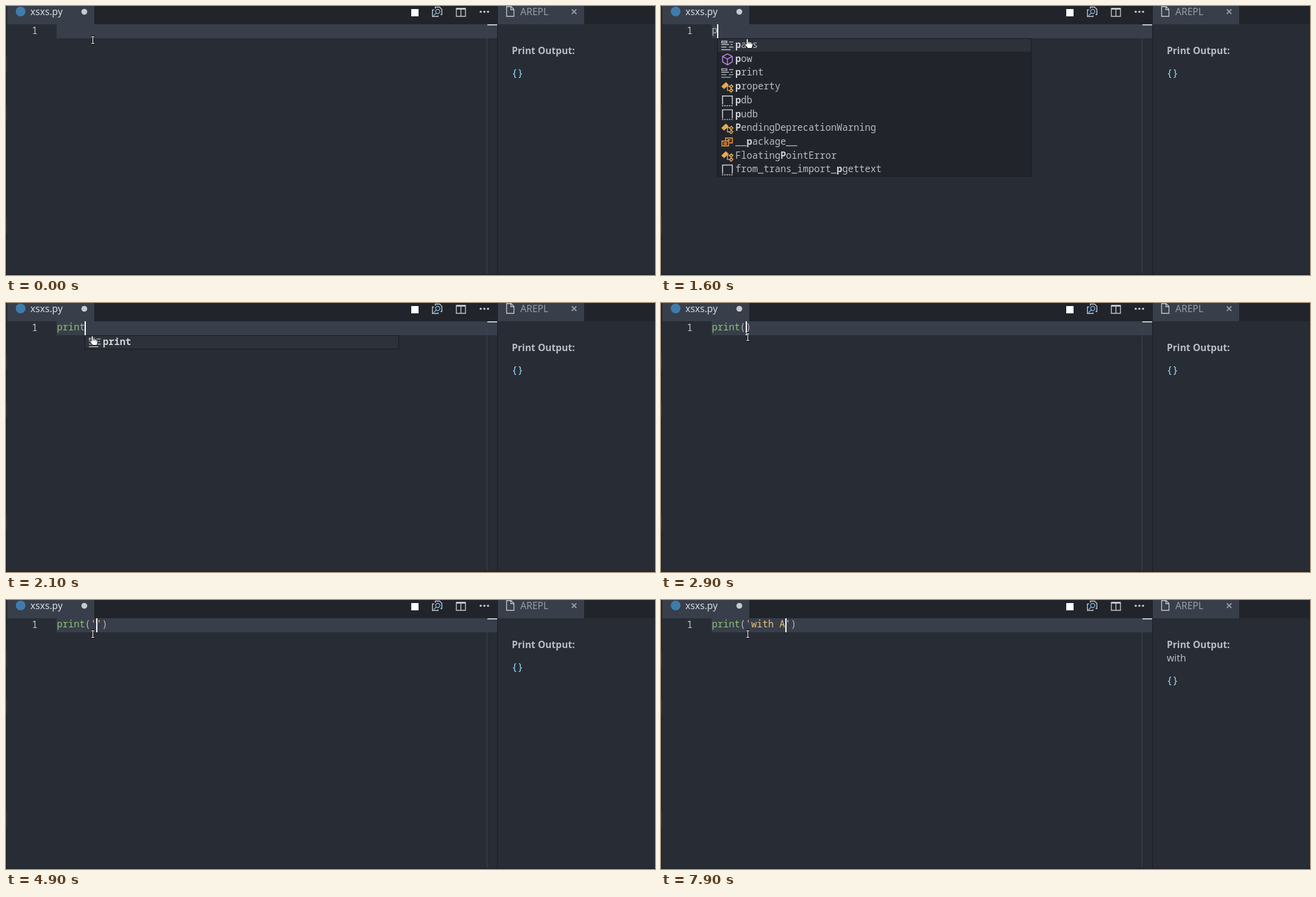
Recreate the animation shown at these times as an HTML page. Size 1065 px wide and 442 px high, loop 8 s.

```html
<!DOCTYPE html>
<html lang="en">
<head>
<meta charset="utf-8">
<title>Typing in an editor</title>
<style>
html, body { margin: 0; width: 100%; height: 100%; overflow: hidden; background: #282c34; }
svg { display: block; width: 1065px; height: 442px; }
text { font: 15.6px "Noto Sans", sans-serif; fill: #b9bcc2; white-space: pre; }
.mono { font: 15.4px "Noto Sans Mono", monospace; }
.mono .hit { font-weight: bold; fill: #d2d4d8; }
.result { font-size: 16px; fill: #9cdcfe; }
</style>
</head>
<body>
<svg viewBox="0 0 1065 442">
  <defs>
    <g id="keyword" fill="none" stroke="#b8bbc0" stroke-width="1.4">
      <path d="M.7 1.7H9.1V4.5H.7ZM12.6 3.1H19.6M0 7.3H12.6M15.4 7.3H18.2M0 11.5H8.4M12.6 11.5H19.6M0 15.7H15.4"/>
    </g>
    <g id="cube" fill="none" stroke="#b180d7" stroke-width="1.6">
      <path d="M10 0L18 4V13L10 18L2 13V4ZM2 4L10 8.5L18 4M10 8.5V18"/>
    </g>
    <g id="klass" fill="#e8ab53" stroke="#e8ab53">
      <path d="M7.5 1.5L11.5 5.5L4.5 12L.5 8Z"/>
      <path d="M8 7.5H14M10 7.5V14.5H14" fill="none" stroke-width="1.4"/>
      <path d="M16.5 5.5L19 8L16 11L13.5 8.5ZM16.5 12L19 14.5L16 17.5L13.5 15Z" fill="none" stroke-width="1.5"/>
    </g>
    <g id="module" fill="none" stroke="#c0c2c6" stroke-width="1.7">
      <path d="M2 15V1H18V15"/>
      <path d="M1 17H19" stroke-dasharray="2.2 1.6"/>
    </g>
    <g id="variable" fill="none" stroke="#e8923a" stroke-width="1.6">
      <path d="M7 6V2H18V10H13M1 7H12V15H1ZM3.5 10H9.5M3.5 12.5H9.5M10 5H15"/>
    </g>
    <g id="hand" stroke="#111">
      <path d="M140 54.5Q141.5 53 143 55V59Q145 58 146 59.5Q148 59 148.5 60.5Q150.5 60.5 150.5 62.5V65L149 69.5H142.5L137.5 63.5Q138 61.5 140 63Z" fill="#fff"/>
      <path d="M143 59V62M145.7 60V62.5M148.3 61V63" stroke-width=".8"/>
    </g>
    <g id="beam" fill="none">
      <path d="M139.5 50H145.5M142.5 50V62M139.5 62H145.5" stroke="#111" stroke-width="2.6"/>
      <path d="M140 50.5H145M142.5 50V62M140 61.5H145" stroke="#fff" stroke-width="1.1"/>
    </g>
  </defs>

  <!-- window, tabs and panes -->
  <path d="M0 0H1065V30H0ZM0 30H1.5V442H0ZM0 440H1065V442H0Z" fill="#21252b"/>
  <path d="M0 83H1.5V110H0ZM0 163H1.5V188H0ZM0 347H1.5V374H0Z" fill="#30353e"/>
  <path d="M2 0H145V30H2ZM807 0H949V30H807ZM83 30H806V53H83Z" fill="#383e4a"/>
  <path d="M145.5 0V30M806.5 0V442M949.5 0V30" stroke="#1b1e23"/>
  <path d="M789.5 30V440" stroke="#3d424b"/>
  <path d="M790 30H806V32H790Z" fill="#c4c6c9"/>

  <circle cx="24" cy="9" r="8" fill="#3f7cac"/>
  <text x="40" y="15" style="fill:#d7dae0">xsxs.py</text>
  <circle cx="128.5" cy="9.5" r="4.8" fill="#c8c9cb"/>
  <rect x="665" y="5" width="12" height="12" fill="#fff"/>
  <g fill="none" stroke="#c5c6c8" stroke-width="1.4">
    <path d="M704.5 4.5V1.7H711.5L715.3 5.5V14H713M702.5 6.5H699.7V17.3H709V15.5"/>
    <path d="M739 4H754V17H739ZM746.5 4V17"/>
    <path d="M739 4.5H754" stroke-width="3"/>
    <path d="M821.5 1V17H833.5V5.5L829 1ZM828.5 1V6H833.5"/>
    <path d="M928.5 5.5L936 13M936 5.5L928.5 13" stroke="#989da6" stroke-width="1.8"/>
    <g stroke="#75aede" stroke-width="1.5"><circle cx="708.5" cy="9" r="3.4"/><path d="M706 11.5L701.5 16"/></g>
  </g>
  <g fill="#c8c9cb"><circle cx="779" cy="9.5" r="1.8"/><circle cx="785" cy="9.5" r="1.8"/><circle cx="791" cy="9.5" r="1.8"/></g>
  <text x="844" y="15" style="fill:#989da6">AREPL</text>
  <text x="42.5" y="45.5" class="mono" style="fill:#c8cacd">1</text>
  <text x="830" y="79" style="font-weight:bold">Print Output:</text>
  <g id="live"></g>
</svg>
<script>
const LOOP = 8000, LEFT = 83.45, CHAR = 9.3, ROW = 22.7;
const live = document.getElementById('live');

// time, text, caret column, completion query
const edits = [
  [-500, '', 0],
  [1600, 'p', 1, 'p'],
  [1700, 'pr', 2, 'p'],
  [1800, 'pri', 3, 'pr'],
  [1900, 'prin', 4, 'prin'],
  [2100, 'print', 5, 'print'],
  [2900, 'print()', 6],
  [3300, 'print()', 7],
  [3900, "print('')", 7],
  [5100, "print('w')", 8],
  [5200, "print('wi')", 9],
  [5400, "print('wit')", 10],
  [5600, "print('with')", 11],
  [5800, "print('with ')", 12],
  [7900, "print('with A')", 13]
];

const symbols = [
  ['pass', 'keyword'], ['pow', 'cube'], ['print', 'keyword'], ['property', 'klass'],
  ['pdb', 'module'], ['pudb', 'module'], ['PendingDeprecationWarning', 'klass'],
  ['__package__', 'variable'], ['FloatingPointError', 'klass'],
  ['from_trans_import_pgettext', 'module']
];

const span = (text, color) => `<tspan style="fill:${color}">${text}</tspan>`;
const mono = (x, y, body) => `<text class="mono" x="${x}" y="${y}">${body}</text>`;
const rect = (x, y, w, h, style) => `<rect x="${x}" y="${y}" width="${w}" height="${h}" ${style}/>`;

// Marks the query letters in order from the first word start; empty if they do not all occur.
function highlight(label, query) {
  let next = 0, out = '';
  const start = label.search(/\bp|_p|P/);
  [...label].forEach((c, i) => {
    const hit = i >= start && c.toLowerCase() === query[next];
    if (hit) next++;
    out += hit ? `<tspan class="hit">${c}</tspan>` : c;
  });
  return next === query.length ? out : '';
}

function popup(x, query) {
  const rows = symbols.map(([label, icon]) => [highlight(label, query), icon]).filter(r => r[0]);
  return rect(x + .5, 53.5, 515, ROW * rows.length - .5, 'fill="#21252b" stroke="#181a1f"') +
    rect(x + 1, 54, 514, ROW - 1.5, 'fill="#2c313a"') +
    rows.map(([body, icon], i) =>
      `<use href="#${icon}" x="${x + 7}" y="${56 + ROW * i}"/>` +
      mono(x + 30, 69 + ROW * i, body)).join('');
}

function code(text) {
  const [, name, open, string, close] = text.match(/^(\w*)(\(?)('.*')?(\)?)$/);
  return span(name, name === 'print' ? '#8bc275' : '#b4b9c1') + span(open, '#b4b9c1') +
    span(string || '', '#e5c07b') + span(close, '#b4b9c1');
}

function draw(t) {
  const [since, text, column, query] = edits.filter(e => e[0] <= t).pop();
  const caret = Math.floor(LEFT + CHAR * column);
  let out = '';

  if (t >= 3000 && t < 3900) {
    const box = 'fill="#006400" fill-opacity=".1" stroke="#7b8078"';
    out += rect(129.5, 30.5, 9, 22, box) + rect(138.5, 30.5, 9, 22, box) +
      rect(794, 32, 8, 20, 'fill="#a0a09a"');
  }
  out += mono(LEFT, 45, code(text));
  if (Math.floor((t - since) / 500) % 2 === 0) out += rect(caret, 30, 2, 23, 'fill="#fff"');
  if (query) out += popup(caret, query);
  out += `<use href="#${query ? 'hand' : 'beam'}"/>`;

  const printed = t >= 6100;
  if (printed) out += '<text x="830" y="101">with</text>';
  out += `<text class="mono result" x="829.7" y="${printed ? 137.5 : 115.5}">{}</text>`;
  live.innerHTML = out;
}

function frame() {
  draw(performance.now() % LOOP);
  requestAnimationFrame(frame);
}
frame();
</script>
</body>
</html>
```
